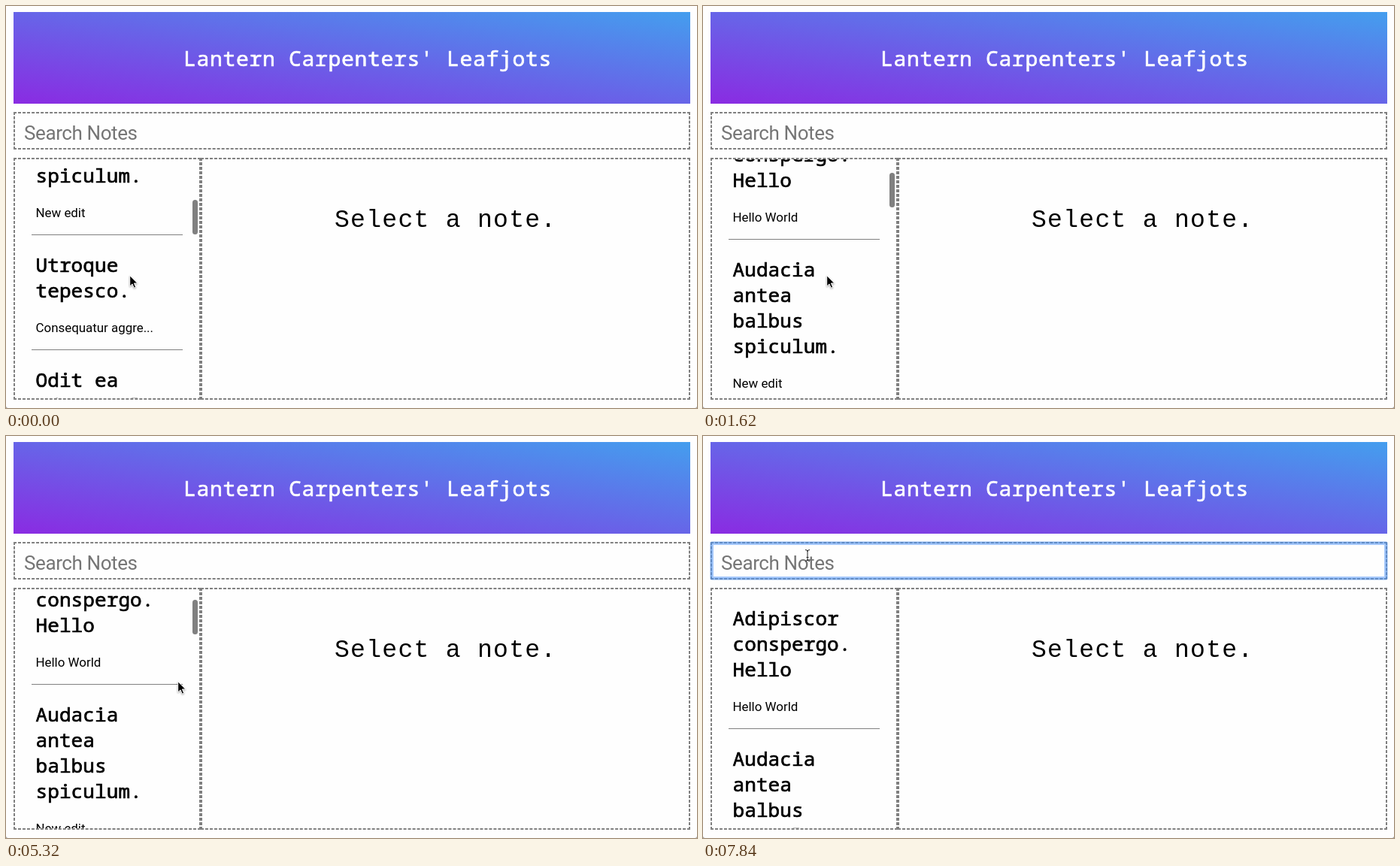
Write an HTML page that moves like this. It is 919x535 px and loops after 8 s.

```html
<!DOCTYPE html>
<html lang="en">
<head>
<meta charset="utf-8">
<title>Notes</title>
<style>
  html, body { margin: 0; width: 100%; height: 100%; overflow: hidden; background: #fefefe; }
  div, svg { position: absolute; box-sizing: border-box; }
  svg { left: 0; top: 0; }
  .header { left: 10px; top: 8px; width: 900px; height: 122px;
    background: linear-gradient(to top right, #8a2be2, #449eee); }
  /* Boxes are laid out at double size for high-density dashes. */
  .box { border: 4px dashed gray; transform: scale(.5); transform-origin: 0 0; }
  .search { left: 10px; top: 141px; width: 1800px; height: 100px; }
  .list { left: 10px; top: 202px; width: 498px; height: 644px; }
  .detail { left: 259px; top: 202px; width: 1302px; height: 644px; }
  .mono { font: 500 26px "Noto Sans Mono", monospace; letter-spacing: .1px; stroke: #000; stroke-width: .7px; }
  .brand { font-size: 28px; letter-spacing: .7px; fill: #fff; stroke: #fff; }
  .body { font: 16.9px Roboto, sans-serif; }
  .placeholder { font-size: 26px; letter-spacing: -.4px; fill: #757575; }
  .prompt { font: 33px "Liberation Mono", monospace; letter-spacing: 1.3px; }
  #arrow { filter: drop-shadow(0 1px 1px rgba(0, 0, 0, .35)); }
</style>
</head>
<body>
<div class="header"></div>
<div class="box search"></div>
<div class="box list"></div>
<div class="box detail"></div>
<svg width="919" height="535" viewBox="0 0 919 535">
  <clipPath id="viewport"><rect x="12" y="204" width="245" height="318"/></clipPath>
  <text class="mono brand" x="236" y="80">Lantern Carpenters' Leafjots</text>
  <text class="body placeholder" x="24" y="178">Search Notes</text>
  <text class="prompt" x="437" y="294">Select a note.</text>
  <g clip-path="url(#viewport)"><g id="notes"></g></g>
  <rect id="scrollbar" x="248" width="7" height="46" rx="3.5" fill="#808080"/>
  <g id="focus" fill="none">
    <rect x="11" y="142" width="898" height="48" rx="1" stroke="#4d90e8" stroke-width="3" opacity=".65"/>
    <rect x="13" y="144" width="894" height="44" stroke="#a5c8fb" stroke-width="2"/>
  </g>
  <rect id="caret" x="13" y="149" width="1" height="35"/>
  <path d="M0 533v2h2zM919 533v2h-2z" fill="#aaa"/>
  <path id="arrow" d="M.7.8V15L4 11.9 6.3 17.2 8.7 16.2 6.4 11H10.8Z" stroke="#fff"/>
  <path id="beam" d="M-3-7.5Q0-7.5 0-5.5Q0-7.5 3-7.5M0-6V6M-3 7.5Q0 7.5 0 5.5Q0 7.5 3 7.5M-1.5 2.5H1.5"
    fill="none" stroke="#222"/>
</svg>
<script>
const LOOP = 8000, TICK = 148, LINE = 34;
const el = id => document.getElementById(id);

const notes = [
  ["Adipiscor conspergo. Hello", "Hello World"],
  ["Audacia antea balbus spiculum.", "New edit"],
  ["Utroque tepesco.", "Consequatur aggre..."],
  ["Odit&nbsp;ea adnuo&nbsp;vel.", ""]
];

// Each move leads to (x, y) between two ticks, bowing sideways midway.
const moves = [
  { start: 14, end: 21, x: 114, y: 273, bowX: -100 },
  { start: 21, end: 31, x: 228, y: 326, bowX: -50, bowY: 178 },
  { start: 38, end: 41, x: 222, y: 197 },
  { start: 41, end: 45, x: 205, y: 181 },
  { start: 47, end: 49, x: 139, y: 159 }
];

// Eased progress from 0 to 1 between two ticks.
function glide(tick, start, end) {
  const p = Math.min(1, Math.max(0, (tick - start) / (end - start)));
  return p * p * (3 - 2 * p);
}

function pointerAt(tick) {
  let x = 164, y = 358;
  for (const move of moves) {
    const p = glide(tick, move.start, move.end);
    const bow = Math.sin(Math.PI * p);
    x += (move.x - x) * p + (move.bowX || 0) * bow;
    y += (move.y - y) * p + (move.bowY || 0) * bow;
  }
  return [Math.round(x), Math.round(y)];
}

function buildNotes() {
  const text = (cls, y, s) => `<text class="${cls}" x="39.5" y="${y}">${s}</text>`;
  let y = 252, html = "";
  for (const [title, excerpt] of notes) {
    for (const word of title.split(" ")) {
      html += text("mono", y, word);
      y += LINE;
    }
    html += text("body", y + 12, excerpt);
    html += `<rect x="34" y="${y + 35}" width="201" height="1" fill="gray"/>`;
    y += 85;
  }
  el("notes").innerHTML = html;
}

function draw(now) {
  const tick = Math.floor((now % LOOP + 30) / TICK);
  const scroll = 306 - 11 * glide(tick, 0, 2) - 216 * glide(tick, 5, 10) - 79 * glide(tick, 34, 40);
  const barOpacity = 1 - glide(tick, 14, 16) + glide(tick, 34, 35) - glide(tick, 42, 44);
  const overInput = tick >= 43;
  const set = (id, name, value) => el(id).setAttribute(name, value);

  set("notes", "transform", `translate(0 ${-Math.round(scroll)})`);
  set("scrollbar", "y", Math.round(209 + scroll * .16));
  set("scrollbar", "opacity", barOpacity);
  set("focus", "opacity", glide(tick, 48, 50));
  set("caret", "opacity", tick >= 49 && tick < 53 ? 1 : 0);
  for (const id of ["arrow", "beam"]) {
    set(id, "transform", `translate(${pointerAt(tick)})`);
    el(id).style.display = (id === "beam") === overInput ? "" : "none";
  }
}

function frame() {
  draw(performance.now());
  requestAnimationFrame(frame);
}

buildNotes();
frame();
</script>
</body>
</html>
```
